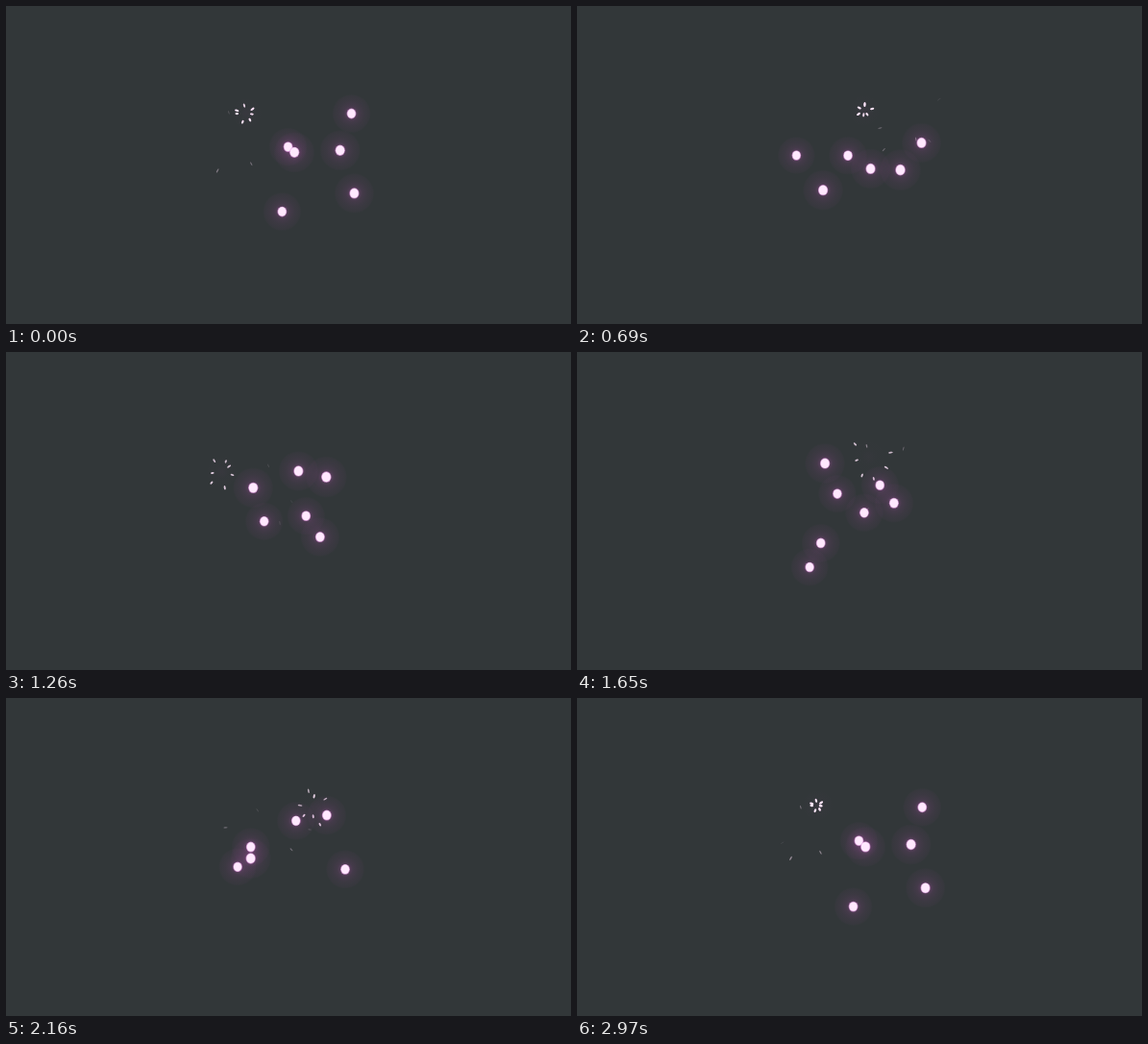
Animation, 588 px wide and 331 px high, one loop 3000 ms. Source, as an HTML page with a canvas:

```html
<!DOCTYPE html>
<html lang="en">
<head>
<meta charset="utf-8">
<title>Sparkling orbs</title>
<style>
html, body { margin: 0; width: 100%; height: 100%; overflow: hidden; background: #323739; }
canvas { display: block; }
</style>
</head>
<body>
<canvas id="stage" width="588" height="331"></canvas>
<script>
const ctx = document.getElementById('stage').getContext('2d');
const BACK = '#323739', LOOP = 3000, STEP = 30;
const LIFE = 1105, FIRST_BURST = 100;
const RISE = 80.5, SLOWDOWN = 48;      // px/s at half-life, px/s²
const SPARKS = 7, GRAVITY = 50;

// Where each orb is halfway through its flight, in launch order
const midpoints = [
  [356, 143.5], [292, 167], [347.5, 158], [300, 146], [361, 173], [284, 175],
  [229, 162], [336, 163], [305, 146], [257, 151], [269, 172], [314, 151],
  [330, 156], [300, 151], [254.5, 166], [241, 173], [253.5, 149]
];

const wrap = ms => (ms % LOOP + LOOP) % LOOP;

function rand(n) {
  const v = Math.sin(n * 12.9898 + 4.1) * 43758.5453;
  return v - Math.floor(v);
}

const orbs = midpoints.map(([x, y], i) => ({
  x, y, id: i,
  burst: FIRST_BURST + i * LOOP / midpoints.length,
  drift: -8 * Math.sin((i - 2.5) * Math.PI / 6),
  r: 4.6 + .6 * rand(i)
}));

function place(orb, age) {
  const s = (age - LIFE / 2) / 1000;
  return [orb.x + orb.drift * s, orb.y - RISE * s + SLOWDOWN / 2 * s * s];
}

function ellipse(x, y, rx, ry, fill) {
  ctx.fillStyle = fill;
  ctx.beginPath();
  ctx.ellipse(x, y, rx, ry, 0, 0, 2 * Math.PI);
  ctx.fill();
}

function glow(x, y, r, strength) {
  const g = ctx.createRadialGradient(x, y, 0, x, y, r);
  const stops = [[0, .38], [.25, .24], [.4, .13], [.65, .07], [.92, .035], [1, 0]];
  for (const [at, alpha] of stops) g.addColorStop(at, `rgba(190,80,185,${alpha * strength})`);
  ellipse(x, y, r, r, g);
}

function drawCore(x, y, r) {
  ellipse(x, y, r + .1, r * 1.1 + .1, 'rgba(236,165,234,.7)');
  ellipse(x, y, r - .6, r * 1.1 - .6, '#ffe8fe');
}

function drawSparks(orb, age) {
  const [x, y] = place(orb, LIFE);
  const s = age / 1000;
  if (age < 200) glow(x, y, 16, .2 * (1 - age / 200));
  for (let i = 0; i < SPARKS; i++) {
    const [a, b, c, d] = [0, 1, 2, 3].map(k => rand(orb.id * 40 + i * 4 + k));
    const fade = 1 - age / (180 + 220 * a);
    if (fade <= 0) continue;
    const angle = (i + b) / SPARKS * 2 * Math.PI + orb.id;
    const speed = 70 + 100 * c;
    const vx = Math.cos(angle) * speed, vy = Math.sin(angle) * speed;
    ctx.save();
    ctx.translate(x + vx * s, y + vy * s + GRAVITY / 2 * s * s);
    ctx.rotate(Math.atan2(vy + GRAVITY * s, vx));
    ctx.globalAlpha = Math.min(1, fade * 1.3);
    ellipse(0, 0, 1.8 + .6 * d, .4 + .9 * fade, '#ffe6fb');
    ctx.restore();
  }
}

function draw(t) {
  ctx.fillStyle = BACK;
  ctx.fillRect(0, 0, 588, 331);
  const flying = [];
  for (const orb of orbs) {
    const age = wrap(t - orb.burst + LIFE);
    if (age < LIFE) flying.push([...place(orb, age), orb.r]);
    else drawSparks(orb, age - LIFE);
  }
  for (const [x, y, r] of flying) glow(x, y, r * 4.2, 1);
  for (const [x, y, r] of flying) drawCore(x, y, r);
}

const start = performance.now();
function tick() {
  const t = wrap(performance.now() - start);
  draw(Math.floor(t / STEP) * STEP);
  requestAnimationFrame(tick);
}
tick();
</script>
</body>
</html>
```
